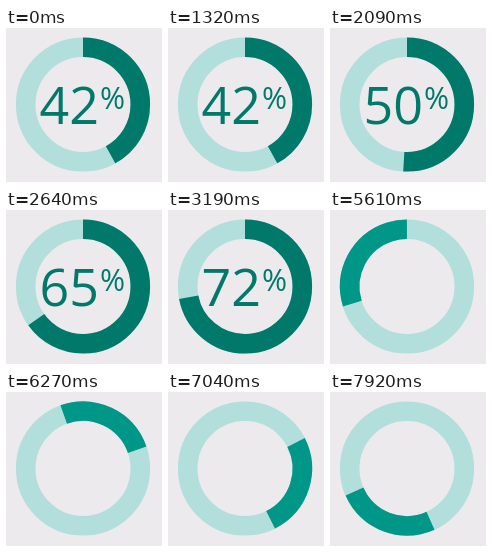
These frames come from a looping animation (156 px wide and 154 px high, 8000 ms). An HTML page:

```html
<!DOCTYPE html>
<html lang="en">
<head>
<meta charset="utf-8">
<title>Circle progress</title>
<style>
  html, body { margin: 0; width: 100%; height: 100%; overflow: hidden; background: #edeaed; }
  svg { display: block; width: 156px; height: 154px; }
  circle { fill: none; stroke-width: 19.6; }
  text { font-family: "Open Sans", "Noto Sans", sans-serif; fill: #00796b; }
  .track { stroke: #b2dfdb; }
  .value { font-size: 52px; }
  .unit { font-size: 30.5px; }
</style>
</head>
<body>
<svg viewBox="0 0 156 154">
  <circle class="track" cx="77" cy="76.5" r="57.3"/>
  <circle id="bar" cx="77" cy="76.5" r="57.3" pathLength="360"/>
  <g id="label">
    <text id="value" class="value" x="33.5" y="96"></text>
    <text class="unit" x="94" y="80.5">%</text>
  </g>
</svg>
<script>
  const LOOP = 8000, STEP = 110;
  const SPIN_START = 4400;
  const bar = document.getElementById('bar');
  const label = document.getElementById('label');
  const value = document.getElementById('value');

  // Leading edge of the spinner: [ms, degrees clockwise from the top]
  const headKeys = [[4400, 259.2], [4510, 261], [4840, 279.8], [5610, 360], [7040, 513.5], [7920, 606.3]];

  const progress = (t, start, length) => Math.min(1, Math.max(0, (t - start) / length));
  const easeInOut = x => (1 - Math.cos(Math.PI * x)) / 2;
  const easeOut = x => 1 - (1 - x) ** 1.33;

  function headAt(t) {
    let i = 1;
    while (i < headKeys.length - 1 && t > headKeys[i][0]) i++;
    const [t0, a0] = headKeys[i - 1], [t1, a1] = headKeys[i];
    return a0 + (a1 - a0) * (t - t0) / (t1 - t0);
  }

  function drawBar(head, length, color) {
    bar.setAttribute('stroke', color);
    bar.setAttribute('stroke-dasharray', `${length} ${360 - length}`);
    bar.setAttribute('transform', `rotate(${head - length - 90} 77 76.5)`);
  }

  function draw(t) {
    const spinning = t >= SPIN_START;
    label.setAttribute('visibility', spinning ? 'hidden' : 'visible');
    if (spinning) {
      const length = 259.2 - 168.7 * easeOut(progress(t, SPIN_START, 1470));
      drawBar(headAt(t), length, '#009688');
    } else {
      const percent = 42 + 30 * easeInOut(progress(t, 1452, 1738));
      value.textContent = Math.floor(percent + 1e-6);
      drawBar(percent * 3.6, percent * 3.6, '#00796b');
    }
  }

  function tick() {
    const t = performance.now() % LOOP;
    draw(Math.floor(t / STEP) * STEP);
    requestAnimationFrame(tick);
  }
  tick();
</script>
</body>
</html>
```
